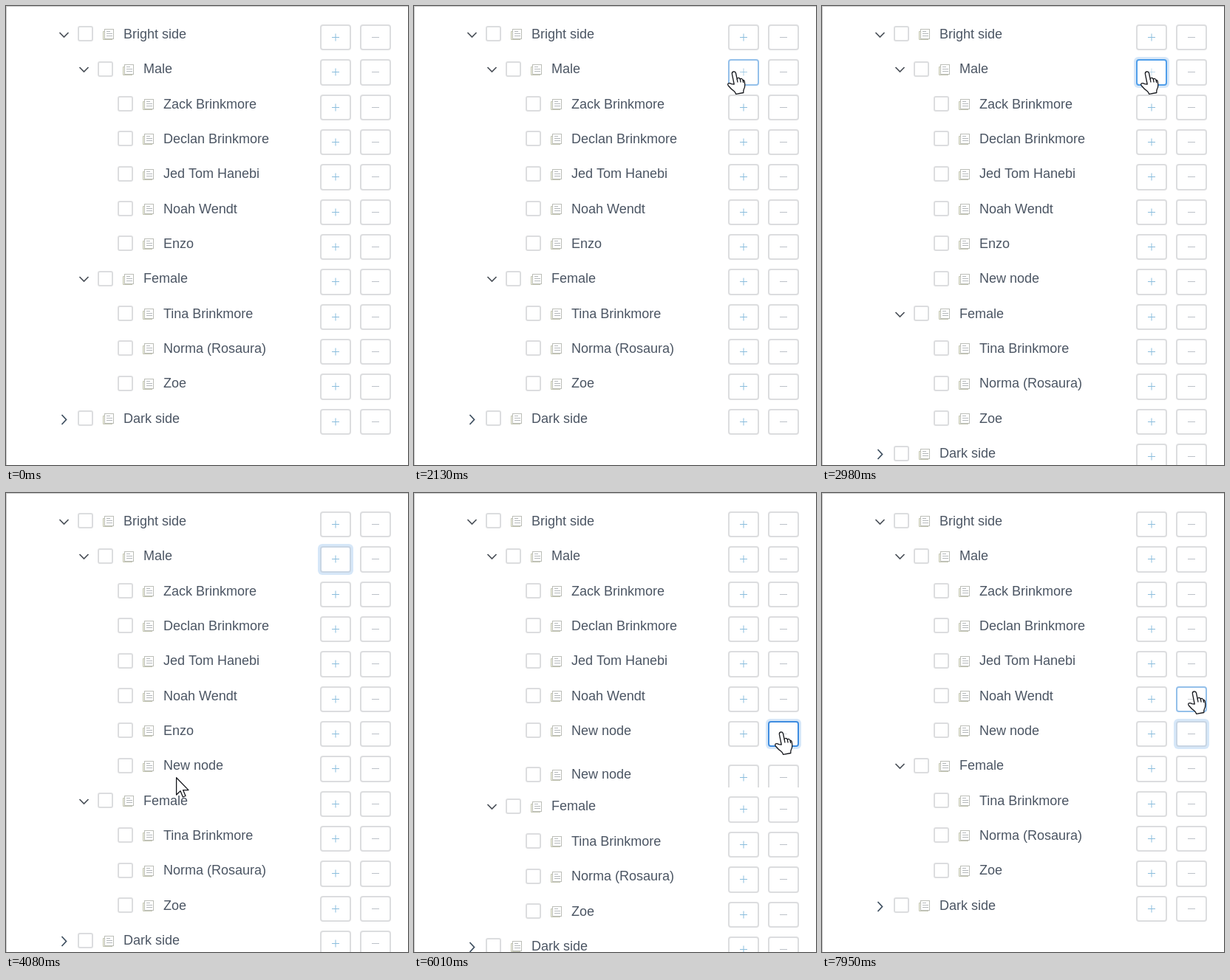
These frames come from a looping animation (544x622 px, 8000 ms). An HTML page with a canvas:

```html
<!DOCTYPE html>
<html lang="en">
<head>
<meta charset="utf-8">
<title>Tree with add and remove buttons</title>
<style>
  html, body { margin: 0; width: 100%; height: 100%; overflow: hidden; background: #fff; }
  canvas { display: block; width: 544px; height: 622px; }
</style>
</head>
<body>
<canvas id="stage" width="544" height="622"></canvas>
<script>
const ctx = document.getElementById('stage').getContext('2d');
const LOOP = 8000, PITCH = 47.35, GAP = 12;
const BTN_W = 42, BTN_H = PITCH - GAP, BTN_X = { add: 425, remove: 479 };
const GRAY = '#dcdddf', FONT = '18px "Liberation Sans", Arial, sans-serif';
const ADD = { start: 2740, end: 2980, origin: 2740 };
const REMOVE = { start: 5940, end: 6250, origin: 5930 };

const node = (label, depth, arrow) => ({ label, depth, arrow });
const head = [
  node('Bright side', 0, 'down'), node('Male', 1, 'down'),
  node('Zack Brinkmore', 2), node('Declan Brinkmore', 2),
  node('Jed Tom Hanebi', 2), node('Noah Wendt', 2)
];
const lastMale = node('Enzo', 2), added = node('New node', 2);
const tail = [
  node('Female', 1, 'down'), node('Tina Brinkmore', 2),
  node('Norma (Rosaura)', 2), node('Zoe', 2), node('Dark side', 0, 'right')
];

// Pointer moves: start, end, number of steps, path of hotspots, easing
const linear = p => p, easeOut = p => 1 - (1 - p) * (1 - p);
const moves = [
  [200, 350, 3, [[333, 388], [304, 173]], linear],
  [580, 580, 1, [[297, 118]], linear],
  [660, 660, 1, null, linear],
  [1120, 1730, 9, [[178, 14], [416, 88]], linear],
  [1960, 2370, 6, [[421, 88], [441, 88]], easeOut],
  [3210, 3700, 7, [[420, 105], [230, 385]], easeOut],
  [4080, 4320, 4, [[230, 385], [249, 379], [241, 378], [237, 378]], linear],
  [4630, 4860, 4, [[262, 366], [422, 320]], easeOut],
  [5090, 5470, 6, [[440, 322], [498, 323]], easeOut],
  [6640, 7400, 11, [[497, 322], [284, 324], [438, 268]], linear],
  [7480, 7950, 7, [[448, 262], [475, 256], [505, 268]], linear]
];

function pointer(t) {
  const move = moves.filter(m => m[0] <= t).pop();
  if (!move || !move[3]) return null;
  const [start, end, steps, path, ease] = move;
  let p = 1;
  if (t < end) p = Math.floor((t - start) / (end - start) * (steps - 1) + 1e-6) / (steps - 1);
  const at = ease(p) * (path.length - 1);
  const i = Math.min(Math.floor(at), path.length - 1);
  const a = path[i], b = path[Math.min(i + 1, path.length - 1)];
  const f = at - i;
  return { x: Math.round(a[0] + (b[0] - a[0]) * f), y: Math.round(a[1] + (b[1] - a[1]) * f) };
}

// Height of the opening or closing row, drawn every 80 ms
function progress(t, phase) {
  const tick = Math.floor((t - phase.origin) / 80) * 80 + phase.origin;
  return Math.min(1, Math.max(0, (tick - phase.start) / 256));
}

function layout(t) {
  const opening = t >= ADD.start && t < ADD.end;
  const closing = t >= REMOVE.start && t < REMOVE.end;
  const open = t >= ADD.end && t < REMOVE.start;
  const rows = [];
  let y = 24.9;
  const put = n => { rows.push({ node: n, y }); y += PITCH; };
  head.forEach(put);
  put(t < REMOVE.start ? lastMale : added);
  if (open) put(added);
  if (opening || closing) {
    const full = PITCH + GAP;
    const height = full * (opening ? progress(t, ADD) : 1 - progress(t, REMOVE));
    rows.push({ node: added, y: y + GAP, clip: y + height });
    y += height + GAP;
  }
  tail.forEach(put);
  return rows;
}

function hit(t) {
  const p = pointer(t);
  if (!p) return { kind: 'none' };
  ctx.font = FONT;
  const rows = layout(t);
  for (let i = 0; i < rows.length; i++) {
    const dy = p.y - Math.round(rows[i].y);
    for (const side in BTN_X) {
      const dx = p.x - BTN_X[side];
      if (dx >= 0 && dx < BTN_W && dy >= 0 && dy < BTN_H) return { ...p, kind: 'hand', key: side + i };
    }
    const dx = p.x - 159 - rows[i].node.depth * 27;
    if (dx >= 0 && dx < ctx.measureText(rows[i].node.label).width && dy >= 3 && dy < 25) {
      return { ...p, kind: 'beam' };
    }
  }
  return { ...p, kind: 'arrow' };
}

function mix(a, b, f) {
  return `rgb(${a.map((v, i) => Math.round(v + (b[i] - v) * f)).join()})`;
}

function line(points, color, width) {
  ctx.beginPath();
  points.forEach(([x, y]) => ctx.lineTo(x, y));
  ctx.strokeStyle = color;
  ctx.lineWidth = width;
  ctx.stroke();
}

function box(x, y, w, h, r, stroke) {
  ctx.beginPath();
  ctx.roundRect(x + 1, y + 1, w - 2, h - 2, r);
  ctx.fillStyle = '#fff';
  ctx.fill();
  ctx.strokeStyle = stroke;
  ctx.lineWidth = 2;
  ctx.stroke();
}

function icon(x, y) {
  ctx.fillStyle = '#f3f4e6';
  ctx.fillRect(x, y + 3, 3, 11);
  ctx.lineWidth = 1;
  ctx.strokeStyle = '#bcbeb8';
  ctx.strokeRect(x + 2.5, y + 0.5, 12, 13);
  line([[x + 2, y + 3.5], [x + 0.5, y + 3.5], [x + 0.5, y + 14.5], [x + 13, y + 14.5]], '#c3c5b2', 1);
  ctx.fillStyle = '#b4b8bb';
  ctx.fillRect(x + 5, y + 3, 5, 1);
  [6, 9].forEach(d => ctx.fillRect(x + 5, y + d, 8, 1));
}

function button(side, y, h, glow, focused, pressed) {
  const x = BTN_X[side];
  if (focused) {
    ctx.beginPath();
    ctx.roundRect(x - 3, y - 3, BTN_W + 6, h + 6, 6);
    ctx.fillStyle = '#d6e7f8';
    ctx.fill();
  }
  const idle = focused ? [201, 214, 228] : [220, 221, 223];
  const lit = pressed ? [62, 140, 224] : focused ? [80, 158, 234] : [100, 172, 242];
  box(x, y, BTN_W, h, 3, mix(idle, lit, glow));
  ctx.globalAlpha = 1 - 0.5 * glow;
  if (side === 'add') {
    ctx.fillStyle = '#8cbedd';
    ctx.fillRect(x + 16, y + 17, 10, 1);
    ctx.fillRect(x + 20.5, y + 12.5, 1, 10);
  } else {
    ctx.fillStyle = '#bcc1c8';
    ctx.fillRect(x + 16, y + 17, 10, 1);
  }
  ctx.globalAlpha = 1;
}

function drawRow(row, i, state) {
  const { label, depth, arrow } = row.node;
  const y = Math.round(row.y), checkY = Math.round(row.y + 2.4), x = depth * 27;
  const h = Math.round(row.y + BTN_H) - y;
  ctx.save();
  if (row.clip !== undefined) {
    ctx.beginPath();
    ctx.rect(0, 0, 544, Math.round(row.clip));
    ctx.clip();
  }
  const cy = y + 14;
  if (arrow === 'down') line([[x + 72.5, cy - 3], [x + 78.5, cy + 3], [x + 84.5, cy - 3]], '#4a5058', 1.7);
  if (arrow === 'right') line([[75.5, cy - 6], [81.5, cy + 0.5], [75.5, cy + 7]], '#3d4e5f', 1.7);
  box(x + 97, checkY, 21, 21, 2, GRAY);
  icon(x + 131, checkY + 4);
  ctx.font = FONT;
  ctx.fillStyle = '#4b5563';
  ctx.fillText(label, x + 159, y + 19);
  for (const side in BTN_X) {
    const key = side + i;
    button(side, y, h, state.glow[key] || 0, state.focus === key, state.pressed);
  }
  ctx.restore();
}

const HAND = new Path2D('M9.2 18L6.4 4.2Q6 1.6 8.4 1Q10.8 .7 11.5 3L13.2 11Q13.4 9.6 15 9.4Q16.8 9.3 17.4 11.4' +
  'Q18 10.2 19.4 10.5Q20.7 10.9 21.1 12.6Q22.5 12.2 23.2 14L23.8 18.5Q24 22 22.3 25Q21.5 27 21.8 29.5L11.6 31.3' +
  'Q11 29 9 27.3Q5 24.5 1.3 20Q-.1 17.8 1.6 16.8Q3.4 16 5.6 17.6Z');
const KNUCKLES = new Path2D('M13.2 11L14 15.5M17.4 11.4L18.1 15.5M21.1 12.6L21.7 16');
const ARROW = new Path2D('M.6 .8V24L6 18.8L9.4 27L13 25.5L9.6 17.6H17Z');
const BEAM = new Path2D('M0 .5H2.5Q4 .5 4.5 2Q5 .5 6.5 .5H9M4.5 2V23M0 24.5H2.5Q4 24.5 4.5 23Q5 24.5 6.5 24.5H9');

function drawPointer({ kind, x, y }) {
  if (kind === 'none') return;
  const [dx, dy, path] = { hand: [10, 0, HAND], arrow: [0, 0, ARROW], beam: [4, 12, BEAM] }[kind];
  ctx.save();
  ctx.translate(x - dx, y - dy);
  ctx.lineWidth = kind === 'beam' ? 1 : 1.3;
  ctx.lineJoin = 'round';
  ctx.strokeStyle = '#15171c';
  ctx.fillStyle = '#fff';
  if (kind !== 'beam') ctx.fill(path);
  ctx.stroke(path);
  if (kind === 'hand') ctx.stroke(KNUCKLES);
  ctx.restore();
}

function draw(t) {
  ctx.fillStyle = '#fff';
  ctx.fillRect(0, 0, 544, 622);
  ctx.fillStyle = '#c8c8c8';
  ctx.fillRect(0, 0, 544, 1);
  ctx.fillRect(0, 0, 1, 622);

  // Border fade: share of the last 150 ms spent over each button
  const glow = {}, samples = 10;
  for (let i = 0; i < samples; i++) {
    const { key } = hit(t - i * 15);
    if (key) glow[key] = (glow[key] || 0) + 1 / samples;
  }
  const during = phase => t >= phase.start && t < phase.end;
  const state = {
    glow,
    focus: t < ADD.start ? '' : t < REMOVE.start ? 'add1' : 'remove6',
    pressed: during(ADD) || during(REMOVE)
  };
  layout(t).forEach((row, i) => drawRow(row, i, state));
  drawPointer(hit(t));
}

const began = performance.now();
function frame() {
  draw((performance.now() - began) % LOOP);
  requestAnimationFrame(frame);
}
frame();
</script>
</body>
</html>
```
